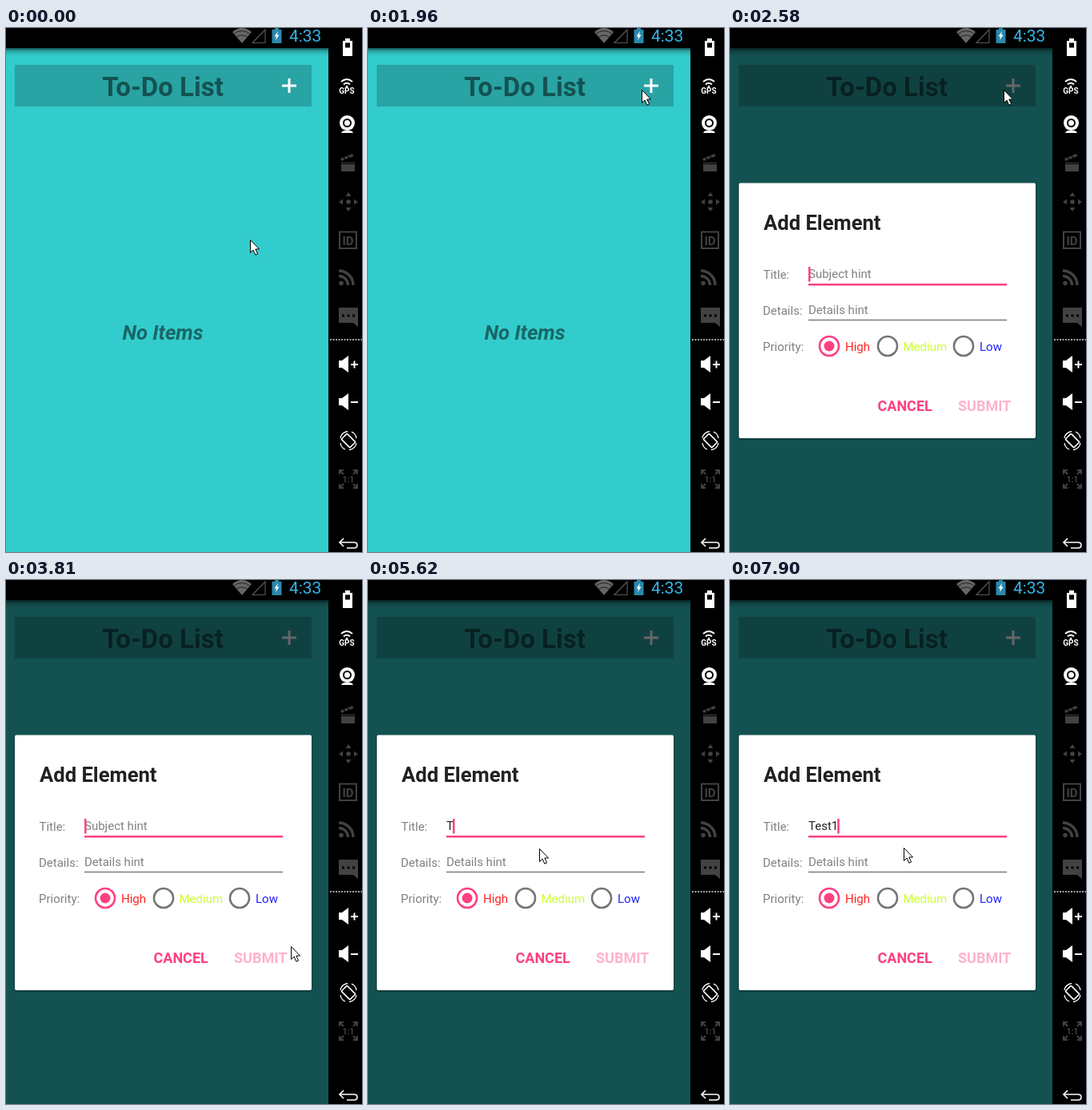
Animation, 445 px wide and 654 px high, one loop 8 s. Source, as an HTML page:

```html
<!DOCTYPE html>
<html lang="en">
<head>
<meta charset="utf-8">
<title>To-Do List</title>
<style>
html, body { margin: 0; width: 100%; height: 100%; overflow: hidden; background: #000; }
svg { display: block; width: 445px; height: 654px; font-family: Roboto, sans-serif; font-size: 15px; }
.b { font-weight: 700; }
.g { fill: #808080; }
.line { fill: none; stroke: #fff; stroke-width: 2; }
.off { fill: #424242; }
.offline { fill: none; stroke: #424242; stroke-width: 2; }
</style>
</head>
<body>
<svg viewBox="0 0 445 654">
  <defs>
    <linearGradient id="shade" x2="0" y2="1">
      <stop offset="0" stop-color="#000" stop-opacity=".6"/>
      <stop offset=".4" stop-color="#000" stop-opacity=".18"/>
      <stop offset="1" stop-color="#000" stop-opacity="0"/>
    </linearGradient>
    <path id="speaker" d="M416 -5h4l8 -6v21l-8 -6h-4z" fill="#fff"/>
  </defs>

  <!-- app screen -->
  <rect width="403" height="654" fill="#33cccc"/>
  <rect y="25" width="403" height="10" fill="url(#shade)"/>
  <rect x="11" y="46" width="371" height="52" fill="#29a3a3"/>
  <text class="b" x="196" y="85" font-size="33" text-anchor="middle" fill="#145252">To-Do List</text>
  <path d="M345 72h18M354 63v18" stroke="#fff" stroke-width="3"/>
  <text class="b" x="196" y="389" font-size="25.6" font-style="italic" text-anchor="middle" fill="#196666">No Items</text>
  <rect id="dim" y="25" width="403" height="629"/>

  <!-- dialog -->
  <g id="dialog">
    <rect x="10" y="194" width="373" height="320" rx="3" opacity=".22"/>
    <rect x="11" y="193.500" width="371" height="318.500" rx="2" fill="#fff"/>
    <text class="b" x="42" y="252" font-size="25.600" fill="#212121">Add Element</text>
    <g class="g">
      <text x="41.500" y="313">Title:</text>
      <text x="41" y="357.500">Details:</text>
      <text x="41" y="402.500">Priority:</text>
      <text x="98" y="357">Details hint</text>
    </g>
    <text id="entry" x="98" y="312"></text>
    <rect x="98" y="319" width="248" height="2.500" fill="#ff4081"/>
    <rect x="98" y="363.800" width="248" height="1.400" fill="#757575"/>
    <g fill="none" stroke="#757575" stroke-width="2.600">
      <circle cx="124" cy="397" r="12" stroke="#ff4081"/>
      <circle cx="197" cy="397" r="12"/>
      <circle cx="292" cy="397" r="12"/>
    </g>
    <circle cx="124" cy="397" r="6.500" fill="#ff4081"/>
    <text x="144" y="402.500" fill="#f22">High</text>
    <text x="216.500" y="402.500" fill="#cf3">Medium</text>
    <text x="312" y="402.500" fill="#22f">Low</text>
    <g class="b" font-size="18" fill="#ff4081">
      <text x="184.500" y="478">CANCEL</text>
      <text x="285" y="478" opacity=".4">SUBMIT</text>
    </g>
    <rect id="caret" y="298" width="2.500" height="18.500" fill="#ff4081"/>
  </g>

  <!-- status bar -->
  <rect width="403" height="25"/>
  <path d="M283 5Q295 -5 307 5L295 19z" fill="#666"/>
  <path d="M284 8Q295 -1 306 8M287 12Q295 6 303 12" fill="none" stroke="#222" stroke-width="1"/>
  <path d="M308 18.500L324 2V18.500z" fill="none" stroke="#555" stroke-width="1.200"/>
  <path d="M336 0h5v2h3.500v17h-12v-17h3.500z" fill="#2b88ad"/>
  <path d="M340 4l-4.500 6.500h2.500l-1 5 4.500-7h-2.500z" fill="#fff"/>
  <text x="354" y="17" font-size="20.800" fill="#33b5e5">4:33</text>

  <!-- emulator toolbar -->
  <rect x="403" width="42" height="654"/>
  <path d="M424 13h6v3h3v19h-12v-19h3z" fill="#fff"/>
  <rect x="424" y="18.500" width="6" height="6"/>
  <path class="line" d="M419 67q7-6 14 0M422 70.500q4-3.500 8 0"/>
  <circle cx="426" cy="73" r="1.300" fill="#fff"/>
  <text class="b" x="426" y="81.500" font-size="10" text-anchor="middle" fill="#fff">GPS</text>
  <circle cx="426.500" cy="118.500" r="9.500" fill="#fff"/>
  <circle cx="426.500" cy="118.500" r="4.500" fill="none" stroke="#000" stroke-width="2"/>
  <path d="M419 131q1-3 5-3h5q4 0 5 3z" fill="#fff"/>

  <path class="off" d="M419 168h17v11h-17zM418 163l15-6 1.500 3-15 6z"/>
  <path d="M422 162l3 3M427 160l3 3M419 169.500h17" stroke="#000" stroke-width="1.200"/>
  <path class="off" d="M428 205l3.500 5h-7zM428 229l3.500-5h-7zM416 217l5-3.500v7zM440 217l-5-3.500v7z"/>
  <circle class="off" cx="428" cy="217" r="2.800"/>
  <rect class="offline" x="417" y="254.500" width="21" height="20.500"/>
  <text class="b off" x="427.500" y="270.500" font-size="15" text-anchor="middle">ID</text>
  <path class="offline" stroke-width="3" d="M416 303a18 18 0 0 1 18 18M416 309.500a11.500 11.500 0 0 1 11.500 11.500" style="stroke-width:3.500"/>
  <circle class="off" cx="419" cy="318.500" r="2.800"/>
  <path class="off" d="M416 349h24v24l-6-5h-18z"/>
  <path d="M420 359h3m3.500 0h3m3.500 0h3" stroke="#000" stroke-width="3"/>
  <path d="M405 389h40" stroke="#ddd" stroke-width="1.500" stroke-dasharray="2 1.500"/>

  <use href="#speaker" y="420"/>
  <use href="#speaker" y="467"/>
  <path class="line" d="M431 420h9M435.500 415.500v9M431 467h9"/>
  <rect class="line" x="423" y="507.500" width="10" height="15" rx="1" transform="rotate(-45 428 515)" style="stroke-width:1.600"/>
  <path class="line" d="M418 512q1-7 9-8.500M438 518q-1 7-9 8.500M418 518q1 6 6 8M438 512q-1-6-6-8" style="stroke-width:1.300"/>
  <path class="offline" d="M417 557v-5h5M417 552l5 5M439 557v-5h-5M439 552l-5 5M417 569v5h5M417 574l5-5M439 569v5h-5M439 574l-5-5"/>
  <text class="b off" x="428" y="567" font-size="10" text-anchor="middle">1:1</text>
  <path class="line" d="M422 637l-5 5 5 5M417 642h18q4 0 4 3.500t-4 3.500h-9" style="stroke-width:1.600"/>

  <path id="cursor" d="M.5 .5V16.500L4 13L6.800 19.200L9.600 18L6.800 12H11.500z" fill="#fff" stroke="#000"/>
</svg>
<script>
const LOOP = 8000;
const [dim, dialog, entry, caret, cursor] =
  ["dim", "dialog", "entry", "caret", "cursor"].map(id => document.getElementById(id));

// Pointer updates come in bursts: first time, last time, count
const bursts = [
  [150, 1140, 8], [1260, 1960, 6], [2420, 3380, 8],
  [3530, 4490, 8], [4640, 5040, 4], [7760, 7900, 2]
];
// Pointer way points: time, x, y
const path = [
  [0, 305, 264], [290, 335, 170], [570, 362, 81], [850, 285, 215],
  [1140, 190, 367], [1260, 157, 389], [1540, 210, 290], [1960, 342, 77],
  [2580, 342, 77], [2980, 345, 200], [3380, 340, 330], [3660, 354, 430],
  [3940, 357, 482], [4490, 320, 458], [4640, 262, 392], [4773, 212, 336],
  [4907, 212, 336], [5040, 214, 335], [7700, 214, 335], [7900, 217, 334]
];
const blinks = [2420, 2980, 3380, 3930, 4350, 4780, 5340, 6520, 6950, 7490, 7760];
const keys = [5620, 5760, 5900, 6050, 7760];

const passed = (times, t) => times.filter(v => v <= t).length;

function lastUpdate(t) {
  let held = 0;
  for (const [from, to, n] of bursts) {
    if (t < from) break;
    const gap = (to - from) / (n - 1);
    held = from + gap * Math.min(n - 1, Math.floor((t - from) / gap + 1e-6));
  }
  return held;
}

function pointerAt(t) {
  const i = path.findIndex(p => p[0] > t);
  if (i < 0) return path[path.length - 1].slice(1);
  const [t0, x0, y0] = path[i - 1], [t1, x1, y1] = path[i];
  const k = (t - t0) / (t1 - t0);
  return [x0 + (x1 - x0) * k, y0 + (y1 - y0) * k];
}

function draw(t) {
  const open = t >= 2420, settled = t >= 2557;
  dim.setAttribute("opacity", settled ? 0.6 : open ? 0.46 : 0);
  dialog.setAttribute("opacity", settled ? 1 : open ? 0.985 : 0);

  const typed = "Test1".slice(0, passed(keys, t));
  entry.textContent = typed || "Subject hint";
  entry.setAttribute("fill", typed ? "#212121" : "#808080");
  caret.setAttribute("x", 98 + (typed ? entry.getComputedTextLength() - 1 : 0));
  caret.setAttribute("opacity", passed(blinks, t) % 2);

  const [x, y] = pointerAt(lastUpdate(t)).map(Math.round);
  cursor.setAttribute("transform", `translate(${x} ${y})`);
}

function tick() {
  draw(performance.now() % LOOP);
  requestAnimationFrame(tick);
}
tick();
</script>
</body>
</html>
```
